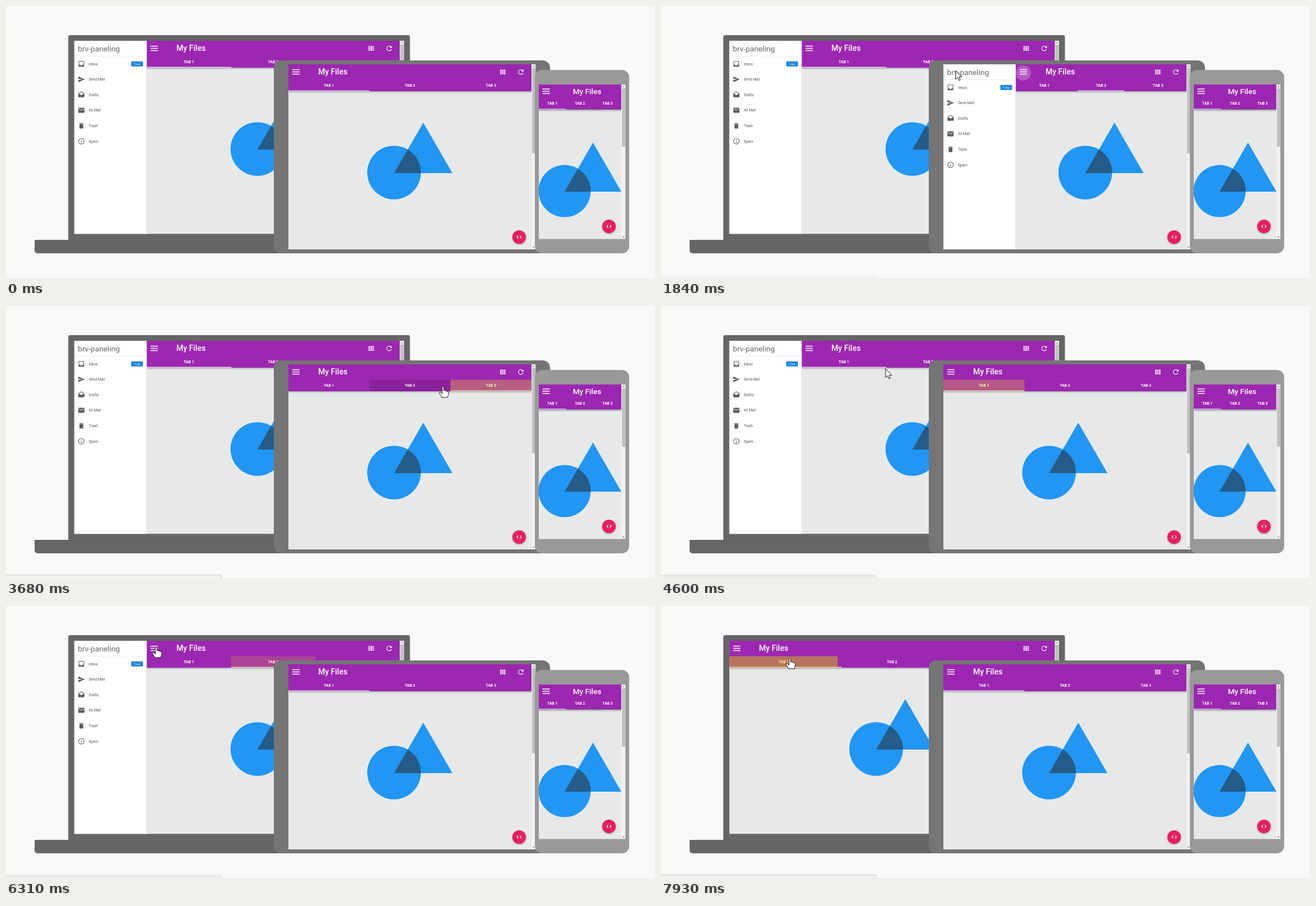
Write an HTML page with a canvas that moves like this. It is 1156x485 px and loops after 8 s.

```html
<!DOCTYPE html>
<html lang="en">
<head>
<meta charset="utf-8">
<title>Responsive devices</title>
<style>
html, body { margin: 0; width: 100%; height: 100%; overflow: hidden; background: #f9f9f9; }
canvas { display: block; width: 1156px; height: 485px; }
</style>
</head>
<body>
<canvas id="stage" width="1156" height="485"></canvas>
<script>
const ctx = document.getElementById('stage').getContext('2d');
const LOOP = 8000, NAV = 129, HEADER = 48;
const PURPLE = '#9c27b0', PAGE = '#e7e9e9';

const clamp = v => Math.min(1, Math.max(0, v));
const easeOut = (k, power = 2) => 1 - (1 - clamp(k)) ** power;

// Each move [start, duration, goal] pulls the value on from wherever it is.
const follow = (t, value, moves, power) =>
  moves.reduce((v, [start, duration, goal]) => v + (goal - v) * easeOut((t - start) / duration, power), value);

// Tab selections are [time, tab, tab width]; the trailing edge lags behind.
function indicatorMoves(selections) {
  const left = [], right = [];
  let last = 0;
  for (const [time, tab, width] of selections) {
    left.push([time + (tab > last ? 90 : 0), 300, tab * width]);
    right.push([time + (tab < last ? 90 : 0), 300, (2 - tab) * width]);
    last = tab;
  }
  return { left, right };
}

const laptop = {
  x: 121.5, y: 62, right: 701.5, bottom: 406.5, thumbEnd: 200,
  startPad: NAV, pads: [[6330, 0]], startRight: 300,
  indicator: indicatorMoves([[5680, 1, 150.3], [6530, 1, 193.3], [7597, 0, 193.3]]),
  ripples: [[5680, 1, 434], [7597, 0, 230]], menuY: 14
};
const tablet = {
  x: 503, y: 104, right: 936, bottom: 434, thumbEnd: 263,
  startPad: 0, pads: [[1480, NAV], [2440, 0]], startRight: 288.7,
  indicator: indicatorMoves([[630, 1, 144.3], [1680, 1, 101.3], [2640, 1, 144.3], [3200, 2, 144.3], [4080, 0, 144.3]]),
  ripples: [[630, 1, 726], [3200, 2, 858], [4080, 0, 582]], menuY: 15.5
};

const cursorPath = [
  [70, 987, 205], [330, 880, 180], [600, 726, 142], [850, 726, 142], [1230, 537, 120],
  [1420, 519, 115], [1800, 519, 115], [2120, 645, 121], [2360, 648, 122], [2750, 648, 122],
  [3130, 858, 145], [3300, 858, 145], [3680, 779, 144], [4000, 582, 144], [4200, 582, 144],
  [4600, 400, 112], [4950, 285, 75], [5140, 285, 75], [5400, 440, 100], [5610, 434, 100],
  [5750, 434, 100], [6150, 268, 73], [6870, 268, 73], [7350, 230, 93], [8000, 230, 93]
];
const statusTimes = [[480, 1350], [3370, 4350], [5330, 5950], [7400, 8000]];

const icons = {
  inbox: 'M19 3H5c-1.1 0-2 .9-2 2v14c0 1.1.9 2 2 2h14c1.1 0 2-.9 2-2V5c0-1.1-.9-2-2-2zm0 12h-4c0 1.7-1.3 3-3 3s-3-1.3-3-3H5V5h14z',
  send: 'M2 21L23 12 2 3V10l15 2-15 2z',
  drafts: 'M22 8c0-.7-.4-1.3-.9-1.7L12 1 2.9 6.3C2.4 6.7 2 7.3 2 8v10c0 1.1.9 2 2 2h16c1.1 0 2-.9 2-2zm-10 5L3.7 7.8 12 3l8.3 4.8z',
  mail: 'M20 4H4c-1.1 0-2 .9-2 2v12c0 1.1.9 2 2 2h16c1.1 0 2-.9 2-2V6c0-1.1-.9-2-2-2zm0 4l-8 5-8-5V6l8 5 8-5z',
  trash: 'M6 19c0 1.1.9 2 2 2h8c1.1 0 2-.9 2-2V7H6zM19 4h-3.5l-1-1h-5l-1 1H5v2h14z',
  info: 'M11 17h2v-6h-2zM12 2a10 10 0 1 0 0 20 10 10 0 0 0 0-20zm0 18a8 8 0 1 1 0-16 8 8 0 0 1 0 16zM11 9h2V7h-2z',
  refresh: 'M17.65 6.35A8 8 0 1 0 19.73 14h-2.08A6 6 0 1 1 12 6c1.66 0 3.14.69 4.22 1.78L13 11h7V4z'
};
for (const name in icons) icons[name] = new Path2D(icons[name]);

const pointers = {
  arrow: new Path2D('M0 0V15.5L3.6 12.2 6 17.5 8.4 16.5 6.1 11.3H11Z'),
  hand: new Path2D('M-2 1.5C-2-.5 1-.5 1 1.5V7c1-1 3-.7 3 .8 1-1 3-.6 3 .9 1-.7 2.2-.2 2.2 1.3V13c0 2.5-1.5 3-1.5 6H-3c0-2-2.6-4-4-7.5-.8-2 1.5-2.5 2.7-1L-2 12.5Z'),
  beam: new Path2D('M-3-5H3M0-5V8M-3 8H3')
};
const menu = [['inbox', 'Inbox'], ['send', 'Send Mail'], ['drafts', 'Drafts'], ['mail', 'All Mail'], ['trash', 'Trash'], ['info', 'Spam']];

function rect(x, y, w, h, color, radius = 0) {
  ctx.fillStyle = color;
  ctx.beginPath();
  ctx.roundRect(x, y, w, h, radius);
  ctx.fill();
}
function disc(x, y, r, color) {
  ctx.fillStyle = color;
  ctx.beginPath();
  ctx.arc(x, y, r, 0, 7);
  ctx.fill();
}
function poly(points, color) {
  ctx.fillStyle = color;
  ctx.beginPath();
  for (const [x, y] of points) ctx.lineTo(x, y);
  ctx.fill();
}
// Places text with its capitals centred on the given height.
function text(string, x, middle, size, color = '#fff', weight = 400, align = 'left') {
  ctx.font = `${weight} ${size}px Roboto, sans-serif`;
  ctx.textAlign = align;
  ctx.fillStyle = color;
  ctx.fillText(string, x, middle + size * 0.355);
}
function icon(name, x, y, scale, color) {
  ctx.save();
  ctx.translate(x - 12 * scale, y - 12 * scale);
  ctx.scale(scale, scale);
  ctx.fillStyle = color;
  ctx.fill(icons[name], 'evenodd');
  ctx.restore();
}
function clipped(x, y, w, h, draw) {
  ctx.save();
  ctx.beginPath();
  ctx.rect(x, y, w, h);
  ctx.clip();
  draw();
  ctx.restore();
}
function shadowed(blur, draw) {
  ctx.save();
  ctx.shadowColor = 'rgba(0,0,0,.4)';
  ctx.shadowBlur = blur;
  ctx.shadowOffsetY = 1;
  draw();
  ctx.restore();
}

function shapes(x, y, scale) {
  const base = y + scale;
  const triangle = [[x, base], [x + 52 * scale, base - 90 * scale], [x + 104 * scale, base]];
  disc(x, y, 47.8 * scale, '#2196f3');
  poly(triangle, '#2196f3');
  ctx.save();
  ctx.beginPath();
  ctx.arc(x, y, 47.8 * scale, 0, 7);
  ctx.clip();
  poly(triangle, '#255b86');
  ctx.restore();
}
function actionButton(x, y) {
  shadowed(3, () => disc(x, y, 12, '#e91e63'));
  ctx.strokeStyle = '#fff';
  ctx.lineWidth = 1.1;
  ctx.beginPath();
  for (const side of [-1, 1]) {
    ctx.moveTo(x + side * 1.6, y - 2.5);
    ctx.lineTo(x + side * 4, y);
    ctx.lineTo(x + side * 1.6, y + 2.5);
  }
  ctx.stroke();
}
function scrollbar(x, top, bottom, thumbEnd) {
  rect(x, top, 7.5, bottom - top, '#f1f1f1');
  rect(x + 1, top + 7, 6, thumbEnd - top - 7, '#c1c1c1');
  const m = x + 3.7;
  poly([[m - 2, top + 4.5], [m, top + 2.5], [m + 2, top + 4.5]], '#777');
  poly([[m - 2, bottom - 4.5], [m, bottom - 2.5], [m + 2, bottom - 4.5]], '#777');
}
function menuButton(x, y) {
  for (const dy of [-4, 0, 4]) rect(x - 6.5, y + dy - 0.8, 13, 1.6, '#fff');
}
function header(left, right, top, height) {
  shadowed(3, () => rect(left, top, right - left, height, PURPLE));
}
function tabLabels(left, width, y, size) {
  for (let i = 0; i < 3; i++) text(`TAB ${i + 1}`, left + width * (i + 0.5), y, size, '#fff', 700, 'center');
}

function sideNav(x, y, height) {
  rect(x, y, NAV, height, '#fff');
  rect(x + NAV - 0.7, y, 0.7, height, '#ddd');
  text('brv-paneling', x + 6.5, y + 14, 13.7, '#666');
  rect(x, y + 27.3, NAV, 0.7, '#e4e4e4');
  menu.forEach(([name, label], i) => {
    const rowY = y + 41.2 + i * 27.6;
    icon(name, x + 12.7, rowY, 0.55, '#5c5c5c');
    text(label, x + 26, rowY, 6.5, '#555');
  });
  rect(x + 101.5, y + 36.8, 21, 9, '#1e88e5', 1);
  text('1 new', x + 112, y + 41.3, 4.3, '#fff', 500, 'center');
}

const rippleStrength = age => age < 0 ? 0 : 1 - clamp((age - 350) / 450);

function layout(device, t) {
  const goals = duration => device.pads.map(([start, goal]) => [start, duration, goal]);
  const left = device.x + follow(t, device.startPad, goals(360));
  return {
    left,
    nav: follow(t, device.startPad, goals(340), 3),
    tabWidth: (device.right - left) / 3,
    tabTop: device.y + 27.5
  };
}

function hoveredTab(device, { left, tabWidth, tabTop }, cursor) {
  const inside = cursor.device === device && cursor.x >= left && cursor.x < device.right &&
    cursor.y >= tabTop && cursor.y < device.y + HEADER;
  return inside ? Math.floor((cursor.x - left) / tabWidth) : -1;
}

function app(device, t, cursor) {
  const { x, y, right, bottom } = device;
  const view = layout(device, t);
  const { left, nav, tabWidth, tabTop } = view;
  const tabHeight = y + HEADER - tabTop;

  clipped(x, y, right + 7.5 - x, bottom - y, () => {
    rect(x, y, right - x, bottom - y, PAGE);
    shapes((left + right) / 2 - 28.3, y + 193, 1);
    header(left, right, y, HEADER);
    if (nav > 0.5) sideNav(x + nav - NAV, y, bottom - y);

    const hover = hoveredTab(device, view, cursor);
    if (hover >= 0) rect(left + hover * tabWidth, tabTop, tabWidth, tabHeight, 'rgba(0,0,0,.12)');
    menuButton(left + 13.5, y + 13.5);
    text('My Files', left + 53, y + 13.5, 14, '#fff', 500);
    for (let i = 0; i < 9; i++) {
      rect(right - 56 + (i % 3) * 3.5, y + 9.4 + Math.floor(i / 3) * 3, 2.9, 2.4, '#f3e3f6');
    }
    icon('refresh', right - 19, y + 13.7, 0.6, '#fff');
    tabLabels(left, tabWidth, y + 38, 6.9);

    const from = left + follow(t, 0, device.indicator.left);
    const to = right - follow(t, device.startRight, device.indicator.right);
    rect(from, y + HEADER - 1.6, Math.max(0, to - from), 1.6, '#e1cdf0');

    for (const [start, tab, rippleX] of device.ripples) {
      const strength = rippleStrength(t - start);
      if (!strength) continue;
      clipped(left + tab * tabWidth, tabTop, tabWidth, tabHeight, () =>
        disc(rippleX, tabTop + 12, 10 + (t - start) * 0.85, `rgba(240,215,25,${0.45 * strength})`));
    }
    for (const [start] of device.pads) {
      const strength = rippleStrength(t - start);
      if (strength) disc(left + 13.5, y + device.menuY, 13.5 * easeOut((t - start) / 150), `rgba(255,255,255,${0.24 * strength})`);
    }
    scrollbar(right, y, bottom, device.thumbEnd);
  });
}

function phone() {
  rect(942, 114, 168, 327, '#999', 13);
  clipped(949, 140, 154.5, 275.5, () => {
    rect(949, 140, 147, 276, PAGE);
    shapes(995, 330, 0.972);
    header(949, 1096, 140, 44.5);
    menuButton(962, 152);
    text('My Files', 1035, 152, 13.6, '#fff', 500, 'center');
    tabLabels(948.5, 49.2, 174, 6.8);
    rect(949, 183, 48.5, 1.5, '#d5bdf0');
    actionButton(1074, 393);
    scrollbar(1096, 140, 415.5, 251);
  });
}

function cursorAt(t) {
  const next = cursorPath.findIndex(([time]) => time > t);
  const [t0, x0, y0] = cursorPath[next - 1] || [0, -99, -99];
  const [t1, x1, y1] = next > 0 ? cursorPath[next] : [1, -99, -99];
  const k = clamp((t - t0) / (t1 - t0)), s = k * k * (3 - 2 * k);
  const x = x0 + (x1 - x0) * s, y = y0 + (y1 - y0) * s;
  const device = x >= 477 && y >= 97 ? tablet : laptop;
  const view = layout(device, t);
  const cursor = { x, y, device, kind: 'arrow' };
  const fromLeft = x - view.left, fromTop = y - device.y;
  if (hoveredTab(device, view, cursor) >= 0 || Math.hypot(fromLeft - 13.5, fromTop - 13.5) < 13) cursor.kind = 'hand';
  else if (fromLeft >= 53 && fromLeft < 108 && fromTop > 6 && fromTop < 22) cursor.kind = 'beam';
  return cursor;
}
function drawCursor({ x, y, kind }) {
  ctx.save();
  ctx.translate(x, y);
  ctx.lineJoin = 'round';
  ctx.lineWidth = 1;
  ctx.fillStyle = '#fff';
  ctx.strokeStyle = kind === 'beam' ? '#444' : '#111';
  if (kind !== 'beam') ctx.fill(pointers[kind]);
  ctx.stroke(pointers[kind]);
  ctx.restore();
}
function statusBubble(t) {
  const span = statusTimes.find(([start, end]) => t >= start && t < end + 550);
  if (!span) return;
  ctx.save();
  ctx.globalAlpha = 1 - clamp((t - span[1]) / 550);
  rect(-2, 479, 386, 10, '#c8c8c8', 3);
  rect(-2, 480, 385, 10, '#f2f2f2', 2);
  ctx.restore();
}

function draw(t) {
  const cursor = cursorAt(t);
  rect(0, 0, 1156, 485, '#f9f9f9');
  rect(111, 52, 608.5, 370, '#666', 3);
  rect(51, 417, 720, 24, '#666', [0, 0, 5, 5]);
  app(laptop, t, cursor);
  rect(477, 97, 492, 344, '#757575', 13);
  app(tablet, t, cursor);
  actionButton(914, 412);
  phone();
  statusBubble(t);
  drawCursor(cursor);
}

const began = performance.now();
function tick() {
  draw((performance.now() - began) % LOOP);
  requestAnimationFrame(tick);
}
tick();
</script>
</body>
</html>
```
